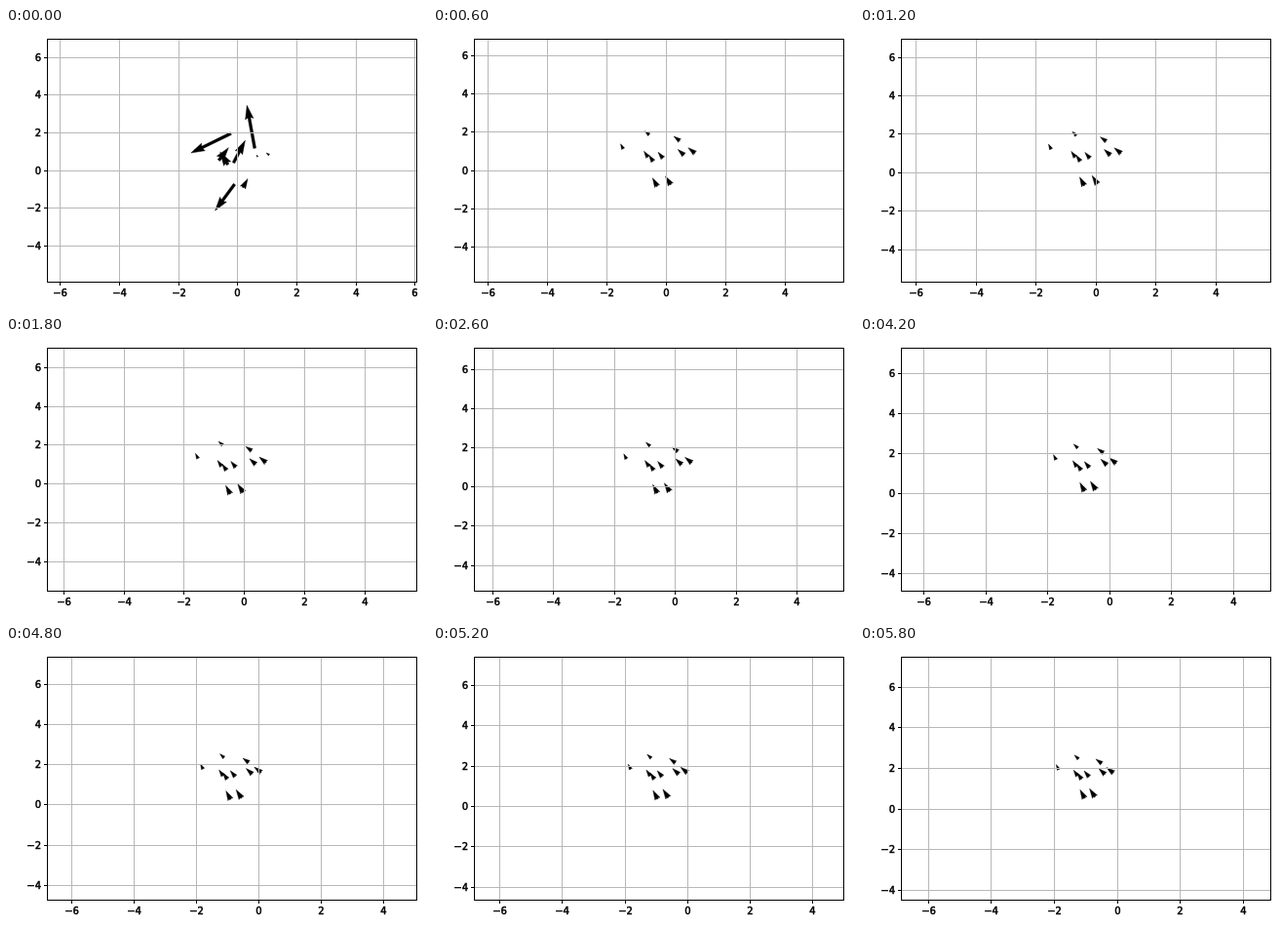
Write an HTML page with a canvas that moves like this. It is 432 by 288 pixels and loops after 6 s.

```html
<!DOCTYPE html>
<html lang="en">
<head>
<meta charset="utf-8">
<title>Flock quiver plot</title>
<style>
  html, body { margin: 0; width: 100%; height: 100%; overflow: hidden; background: #fff; }
  canvas { display: block; width: 432px; height: 288px; }
</style>
</head>
<body>
<canvas id="plot" width="432" height="288"></canvas>
<script>
const ctx = document.getElementById("plot").getContext("2d");

const STEP_MS = 200, STEPS = 30;
const BOX = { left: 41.9, right: 421, top: 11, bottom: 259.6 };
const MARGIN = 5;          // data units around the flock
const SPEED_PX = 165;      // arrow pixels per unit of speed
const COHESION = 0.0105;   // pull towards the middle of the flock
const SETTLE = 1.2;        // steps of own motion kept before aligning
const DECAY = 1 - 1 / SETTLE;
const SHAFT = 2.84;        // arrow shaft width

// home x, y and first arrow in pixels
const flock = [
  [-0.50, 1.80, -41, -20],
  [-1.40, 1.04, 4, 1],
  [-0.54, 0.60, 10, 13],
  [-0.36, 0.37, -8, 13],
  [-0.02, 0.54, 12, 23],
  [0.56, 1.48, -8, 44],
  [0.71, 0.71, -1, 2],
  [1.09, 0.81, -3, 2],
  [-0.22, -0.98, -20, -27],
  [0.25, -0.89, 5, 9]
];

const mean = i => flock.reduce((sum, b) => sum + b[i], 0) / flock.length;
const centre = [mean(0), mean(1)];
const drift = [mean(2) / SPEED_PX, mean(3) / SPEED_PX];

// One axis of a bird: its own speed fades into the common drift plus cohesion.
function motion(bird, axis, n) {
  const home = bird[axis];
  const calm = drift[axis] + COHESION * (centre[axis] - home);
  const extra = (bird[axis + 2] / SPEED_PX - calm) * DECAY ** n;
  return { pos: home + calm * n - SETTLE * extra, px: (calm + extra) * SPEED_PX };
}

function line(x1, y1, x2, y2, color) {
  ctx.strokeStyle = color;
  ctx.lineWidth = 1;
  ctx.beginPath();
  ctx.moveTo(x1, y1);
  ctx.lineTo(x2, y2);
  ctx.stroke();
}

// Arrows shorter than their head shrink as a whole.
function arrow(x, y, u, v) {
  const len = Math.hypot(u, v) / SHAFT;
  const size = SHAFT * Math.min(1, len / 5);
  const l = Math.max(5, len);
  ctx.save();
  ctx.translate(x, y);
  ctx.rotate(Math.atan2(-v, u));
  ctx.scale(size, size);
  ctx.beginPath();
  ctx.moveTo(0, -0.5);
  ctx.lineTo(l - 4.5, -0.5);
  ctx.lineTo(l - 5, -1.5);
  ctx.lineTo(l, 0);
  ctx.lineTo(l - 5, 1.5);
  ctx.lineTo(l - 4.5, 0.5);
  ctx.lineTo(0, 0.5);
  ctx.closePath();
  ctx.restore();
  ctx.fillStyle = ctx.strokeStyle = "#000";
  ctx.lineWidth = 0.4;
  ctx.fill();
  ctx.stroke();
}

function label(value, x, y, align) {
  const text = value < 0 ? "\u2212" + -value : String(value);
  ctx.textAlign = align;
  ctx.fillStyle = ctx.strokeStyle = "#000";
  ctx.lineWidth = 0.5;
  ctx.fillText(text, x, y);
  ctx.strokeText(text, x, y);
}

function evens(lo, hi) {
  const list = [];
  for (let i = Math.ceil(lo / 2) * 2; i <= hi; i += 2) list.push(i || 0);
  return list;
}

// Linear map from the padded range of the values to pixels a..b.
function scale(values, a, b) {
  const lo = Math.min(...values) - MARGIN, hi = Math.max(...values) + MARGIN;
  const map = v => a + (v - lo) / (hi - lo) * (b - a);
  return { map, ticks: evens(lo, hi).map(v => [v, Math.round(map(v))]) };
}

function draw(n) {
  const xs = flock.map(b => motion(b, 0, n));
  const ys = flock.map(b => motion(b, 1, n));
  const sx = scale(xs.map(m => m.pos), BOX.left, BOX.right);
  const sy = scale(ys.map(m => m.pos), BOX.bottom, BOX.top);
  const [left, right, top, bottom] =
    [BOX.left, BOX.right, BOX.top, BOX.bottom].map(Math.round);

  ctx.setTransform(1, 0, 0, 1, 0, 0);
  ctx.fillStyle = "#fff";
  ctx.fillRect(0, 0, 432, 288);
  ctx.translate(0.5, 0.5);
  ctx.font = '10px "DejaVu Sans", sans-serif';
  ctx.textBaseline = "alphabetic";
  ctx.lineJoin = "miter";

  xs.forEach((m, i) => arrow(sx.map(m.pos), sy.map(ys[i].pos), m.px, ys[i].px));

  for (const [, x] of sx.ticks) line(x, top, x, bottom, "#b8b8b8");
  for (const [, y] of sy.ticks) line(left, y, right, y, "#b8b8b8");
  for (const [v, x] of sx.ticks) {
    line(x, bottom, x, bottom + 3.5, "#000");
    label(v, x, bottom + 14.5, "center");
  }
  for (const [v, y] of sy.ticks) {
    line(left - 3.5, y, left, y, "#000");
    label(v, left - 6.5, y + 3.5, "right");
  }

  ctx.strokeStyle = "#000";
  ctx.lineWidth = 1;
  ctx.strokeRect(left, top, right - left, bottom - top);
}

const start = performance.now();
let shown = -1;
function tick() {
  const n = Math.floor((performance.now() - start) / STEP_MS) % STEPS;
  if (n !== shown) draw(shown = n);
  requestAnimationFrame(tick);
}
tick();
</script>
</body>
</html>
```
